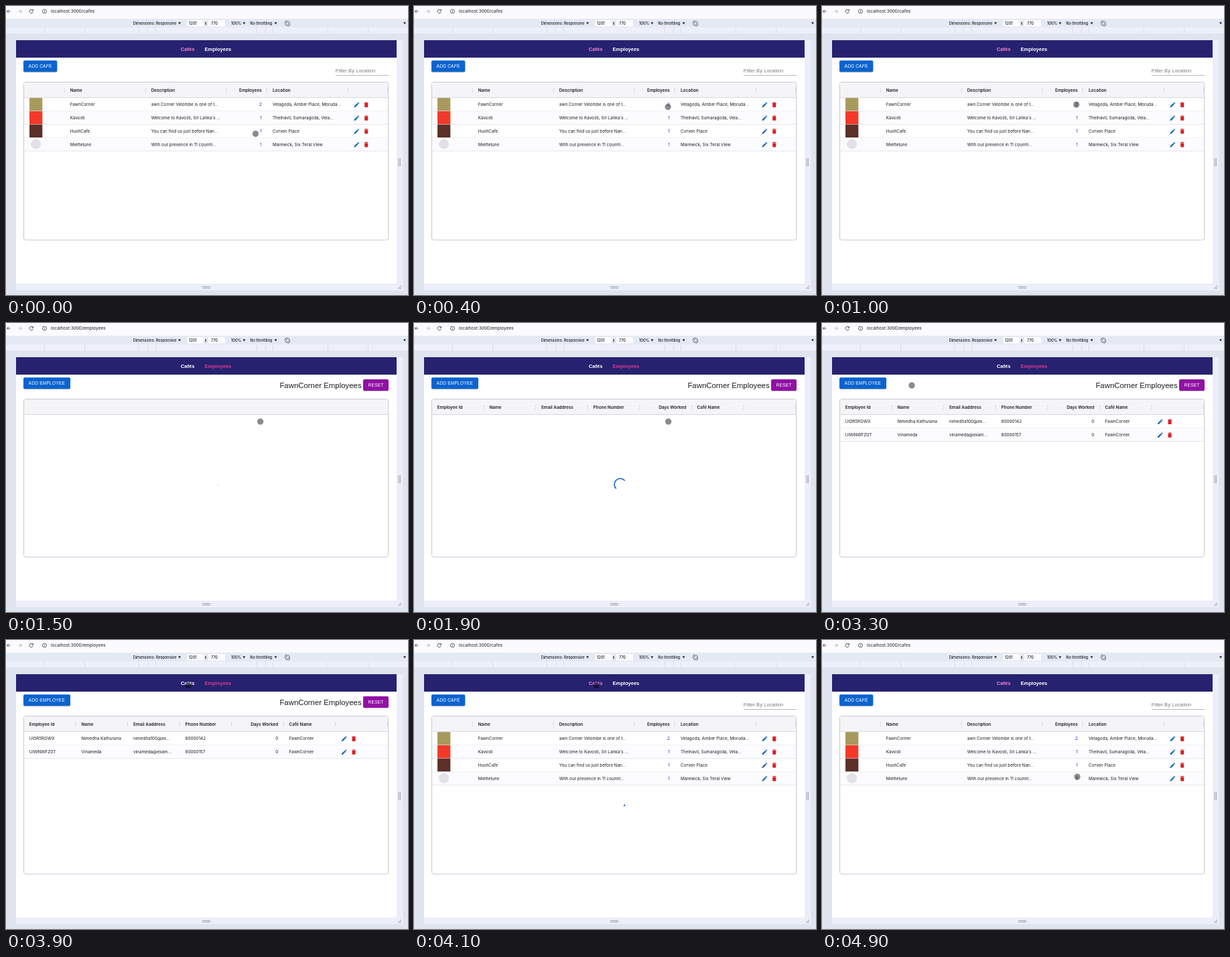
An HTML page for the animation above (5 s loop, 600 by 431 pixels).

```html
<!DOCTYPE html>
<html lang="en">
<head>
<meta charset="utf-8">
<title>Café manager</title>
<style>
  html, body { margin: 0; width: 100%; height: 100%; overflow: hidden; background: #e0e4ef; }
  svg { display: block; width: 600px; height: 431px; }
  text { font-family: Inter, "Noto Sans", sans-serif; font-size: 6.35px; fill: #1c1d22; white-space: pre; }
  .ui { font-size: 5.55px; font-weight: 500; }
  .url { font-size: 6.5px; }
  .head { font-size: 6.4px; font-weight: 600; }
  .link { font-size: 6.8px; fill: #3f2cc4; }
  .nav, .btn, .title, .hint { font-family: "Liberation Sans", Arial, sans-serif; }
  .nav { font-size: 7.57px; font-weight: bold; fill: #fff; }
  .btn { font-size: 6.62px; letter-spacing: .19px; fill: #fff; }
  .title { font-size: 11.4px; }
  .hint { font-size: 7.57px; letter-spacing: .07px; fill: #777; }
</style>
</head>
<body>
<svg id="stage" viewBox="0 0 600 431"></svg>
<script>
const LOOP = 5000, STEP = 100;
const TOP = 137, ROW = 19.8;

const rect = (x, y, w, h, fill, more = '') =>
  `<rect x="${x}" y="${y}" width="${w}" height="${h}" fill="${fill}" ${more}/>`;
const circle = (x, y, r, more) => `<circle cx="${x}" cy="${y}" r="${r}" ${more}/>`;
const path = (d, stroke, width = 1, more = '') =>
  `<path d="${d}" fill="none" stroke="${stroke}" stroke-width="${width}" ${more}/>`;
const text = (x, y, s, cls = '', anchor = 'start') =>
  `<text x="${x}" y="${y}" class="${cls}" text-anchor="${anchor}">${s}</text>`;
const group = (id, s) => `<g id="${id}">${s}</g>`;
const caret = (x, y = 24.2) => `<path d="M${x} ${y}h4l-2 3.4z" fill="#25272d"/>`;

const PENCIL = 'M3 17.25V21h3.75L17.81 9.94l-3.75-3.75L3 17.25zM20.71 7.04c.39-.39.39-1.02 0-1.41l-2.34-2.34c-.39-.39-1.02-.39-1.41 0l-1.83 1.83 3.75 3.75 1.83-1.83z';
const BIN = 'M6 19c0 1.1.9 2 2 2h8c1.1 0 2-.9 2-2V7H6v12zM19 4h-3.5l-1-1h-5l-1 1H5v2h14V4z';
const icon = (d, x, y, fill) =>
  `<path d="${d}" fill="${fill}" transform="translate(${x} ${y}) scale(.42) translate(-12 -12)"/>`;

const button = (x, y, w, label, fill) =>
  rect(x, y + .9, w, 17, '#000', 'rx="2" opacity=".22"') +
  rect(x, y, w, 17, fill, 'rx="2"') + text(x + 7.6, y + 10.7, label, 'btn');

function browser() {
  const ticks = [57, 117, 198, 211, 223, 374, 387, 398, 480, 540];
  return rect(0, 0, 600, 19, '#fbfbfe') + rect(0, 19, 600, 13, '#e5e9f4') +
    rect(0, 32, 600, 9, '#eef0f9') +
    path(ticks.map(x => `M${x}.5 32v9`).join(''), '#d3d8e5', .8) +
    path('M6.5 8H1.5m2.4-2.4L1.5 8l2.4 2.4', '#45474d', .9) +
    path('M18.5 8h5m-2.4-2.4L23.5 8l-2.4 2.4', '#a9abb2', .9) +
    path('M40.2 6.6a2.8 2.8 0 1 0 .2 2.4M40.5 4.8v2.3h-2.3', '#45474d', .9) +
    circle(57.5, 8, 3.1, 'fill="none" stroke="#45474d" stroke-width=".8"') +
    path('M57.5 7.5v2.2M57.5 6v.8', '#45474d', .8) +
    text(189.7, 27.8, 'Dimensions: Responsive', 'ui') + caret(257) +
    rect(270, 21, 25, 9.5, '#fbfbfe', 'rx="1"') + text(273, 27.8, '1201', 'ui') +
    text(296.5, 27.8, 'x', 'ui') +
    rect(302, 21, 25, 9.5, '#fbfbfe', 'rx="1"') + text(306, 27.8, '770', 'ui') +
    text(336, 27.8, '100%', 'ui') + caret(353.3) +
    text(364.3, 27.8, 'No throttling', 'ui') + caret(400.5) + caret(593) +
    `<g transform="rotate(40 420 26)">${rect(418.3, 22.7, 3.4, 6.6, 'none', 'stroke="#3a3c42" stroke-width=".8" rx=".7"')}</g>` +
    path('M416 25.5a4 4 0 0 1 3.4-3.6M424 26.5a4 4 0 0 1-3.4 3.6', '#3a3c42', .8) +
    rect(583, 51, 9.5, 373, '#eceefa') + rect(15, 414, 577.5, 10, '#eceefa') +
    path('M586.2 227v12m2.2-12v12M293 418.5h12m-12 2.2h12', '#8b8f9a', .8) +
    path('M585 422l5-5m-2.3 5l2.3-2.3', '#777b86', .8) +
    rect(15, 51, 568, 363, '#fff') + rect(15, 51, 568, 26, '#262270') +
    rect(26.5, 113.5, 544, 235.5, '#fff', 'rx="3" stroke="#c3cad6"') +
    path('M27 136.5V116.5q0-2.5 2.5-2.5h38q0 0 0 0', 'none') +
    rect(27, 114, 543, 22.5, '#f5f5f7', 'rx="2.5"') + path('M27 136.5h543', '#cbd1db', .8);
}

const headings = (cols, seps) =>
  cols.map(([x, s, anchor]) => text(x, 127.7, s, 'head', anchor)).join('') +
  path(seps.map(x => `M${x} 122v7`).join(''), '#cfd3da', .8);

// Cells follow the columns; dx is the pencil's place.
const table = (cols, rows, dx, linkCol) => rows.map((cells, i) => {
  const y = TOP + i * ROW, mid = y + 10;
  return (i % 2 ? rect(27, y, 543, ROW, '#fcfcfe') : '') +
    path(`M27 ${y + ROW}h543`, '#dde0e7', .8) +
    cells.map((s, c) => text(cols[c][0], mid + 2.2, s, c === linkCol ? 'link' : '', cols[c][2])).join('') +
    icon(PENCIL, dx, mid + .3, '#1565c0') + icon(BIN, dx + 14.3, mid + .2, '#d81f26');
}).join('');

const cafeCols = [[95.7, 'Name'], [216.7, 'Description'], [381.8, 'Employees', 'end'], [398, 'Location']];
const cafes = [
  ['FawnCorner', 'awn Corner Velombe is one of t...', 2, 'Velagoda, Amber Place, Moruda...'],
  ['Kavosti', "Welcome to Kavosti, Sri Lanka's ...", 1, 'Thelnavil, Sumaragoda, Vela...'],
  ['HushCafe', 'You can find us just before Nan...', 1, 'Corven Place'],
  ['Miettelune', 'With our presence in 11 countri...', 1, 'Marewick, Six Teral View']
];
const staffCols = [[34.8, 'Employee Id'], [112.5, 'Name'], [190, 'Email Aaddress'], [267.6, 'Phone Number'],
  [406.2, 'Days Worked', 'end'], [422.5, 'Café Name']];
const staff = [
  ['UI0R5RGWX', 'Nimedha Kathurana', 'nimedha100@ex...', '80000142', 0, 'FawnCorner'],
  ['UIWNWFZ0T', 'Vinameda', 'vinameda@exam...', '80000157', 0, 'FawnCorner']
];

const badges = ['#a89a5c', '#f23a2a', '#5a3028'].map((c, i) => rect(35, TOP + .2 + i * ROW, 19.3, 19.3, c)).join('') +
  circle(44.5, 206, 7.6, 'fill="#e1e2e8"');

const cafePage =
  text(67, 10.4, 'localhost:3000/cafes', 'url') +
  button(26, 81.3, 50.3, 'ADD CAFÉ', '#0b63ce') +
  text(491.7, 99, 'Filter By Location', 'hint') + path('M492 103.5h79', '#9a9a9a', .7) +
  group('cafeHead', headings(cafeCols, [87, 208, 329, 389, 510, 569.5])) +
  group('cafeRows', table(cafeCols, cafes, 523.4, 2) + badges);

const staffPage =
  text(67, 10.4, 'localhost:3000/employees', 'url') +
  button(26, 81.3, 70, 'ADD EMPLOYEE', '#0b63ce') +
  text(530.6, 96.6, 'FawnCorner Employees', 'title', 'end') +
  button(533, 84, 38, 'RESET', '#9310a6') +
  group('staffHead', headings(staffCols, [104, 181.5, 259, 336.7, 414.3, 491.8, 569])) +
  group('staffRows', table(staffCols, staff, 504.8));

document.getElementById('stage').innerHTML = browser() +
  group('cafePage', cafePage) + group('staffPage', staffPage) +
  '<text id="navCafes" x="260.8" y="66.8" class="nav">Cafés</text>' +
  '<text id="navStaff" x="296.4" y="66.8" class="nav">Employees</text>' +
  circle(0, 0, 20.2, 'id="spinner" fill="none" stroke="#1565c0" stroke-width="3.8"') +
  circle(0, 0, 4.5, 'id="dot" fill="#000" fill-opacity=".45" stroke="#000" stroke-opacity=".15" stroke-width=".7"');

const el = id => document.getElementById(id);
const show = (id, on) => el(id).style.display = on ? '' : 'none';
const ease = p => p < .5 ? 2 * p * p : 1 - 2 * (1 - p) ** 2;

// time, x, y of the pointer
const trail = [[0, 372.5, 190.5], [500, 379.6, 147], [2650, 379.6, 147], [3250, 134, 93],
  [3350, 134, 93], [3900, 272, 67.7], [4300, 272, 67.7], [4900, 381, 204], [5000, 381, 204]];

function pointer(t) {
  const i = trail.findIndex(k => k[0] > t);
  const [t0, x0, y0] = trail[i - 1], [t1, x1, y1] = trail[i];
  const p = ease((t - t0) / (t1 - t0));
  return [x0 + (x1 - x0) * p, y0 + (y1 - y0) * p];
}

function spin(age) {
  const p = age / 1400 % 1, first = p < .5;
  const q = ease(first ? p * 2 : p * 2 - 1);
  const dash = first ? 1 + 99 * q : 100;
  const shift = first ? 15 * q : 15 + 110 * q;
  const s = el('spinner');
  s.setAttribute('transform', `translate(307.8 240.7) scale(.43) rotate(${p * 360})`);
  s.setAttribute('stroke-dasharray', `${dash} 200`);
  s.setAttribute('stroke-dashoffset', -shift);
}

function draw(now) {
  const t = Math.floor(now % LOOP / STEP) * STEP;
  const onStaff = t >= 1500 && t < 4000;
  show('cafePage', !onStaff);
  show('staffPage', onStaff);
  show('staffHead', t >= 1600);
  show('staffRows', t >= 2200);
  show('cafeHead', t !== 4000);
  show('cafeRows', t !== 4000);
  el('navCafes').style.fill = onStaff ? '#fff' : '#ee86cf';
  el('navStaff').style.fill = onStaff ? '#e2358f' : '#fff';
  show('spinner', t >= 1500 && t < 2200 || t >= 4000 && t < 4600);
  spin(onStaff ? t - 1490 : Math.max(0, t - 3980));
  el('dot').setAttribute('transform', `translate(${pointer(t)})`);
}

const start = performance.now();
function tick() {
  draw(performance.now() - start);
  requestAnimationFrame(tick);
}
tick();
</script>
</body>
</html>
```
